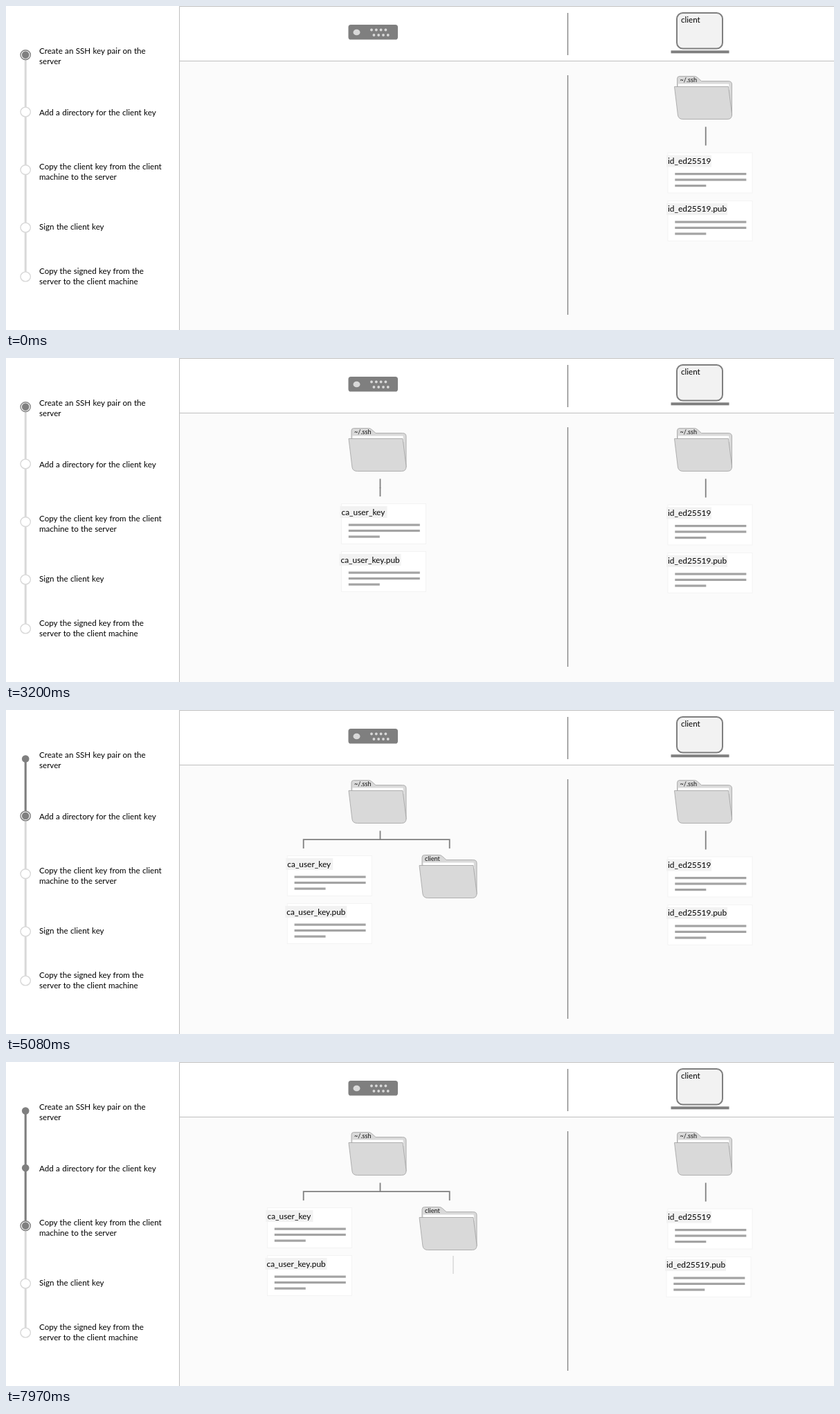
An HTML page for the animation above (8000 ms loop, 1196 by 468 pixels).

```html
<!DOCTYPE html>
<html lang="en">
<head>
<meta charset="utf-8">
<title>Signing a client key</title>
<style>
  html, body { margin: 0; width: 100%; height: 100%; overflow: hidden; background: #fff; }
  svg { display: block; width: 100%; height: 100%; }
  text { font-family: Lato, "Open Sans", sans-serif; font-size: 11.6px; word-spacing: .4px; fill: #000; }
  .name { font-size: 11.9px; }
  .tab { font-size: 9.1px; fill: #111; }
  .dark { stroke: #7f7f7f; fill: none; }
</style>
</head>
<body>
<svg id="stage" viewBox="0 0 1196 468"></svg>
<script>
const LOOP = 8000, STEP = 40, GREY = '#7f7f7f', AXIS = 28.2;
const stops = [70.6, 153, 236.6, 320, 391];

const text = (x, y, s, cls = '') => `<text x="${x}" y="${y}" class="${cls}">${s}</text>`;
const rect = (x, y, w, h, fill, more = '') =>
  `<rect x="${x}" y="${y}" width="${w}" height="${h}" fill="${fill}" ${more}/>`;
const path = (d, w = 1.8) => `<path class="dark" stroke-width="${w}" d="${d}"/>`;
const group = (id, body) => `<g id="${id}">${body}</g>`;

function folder(x, y, label) {
  return `<g transform="translate(${x} ${y})" stroke="#a0a0a0" stroke-width=".8">
    <path fill="#d9d9d9" d="M4.5 20V4Q4.5 .5 8 .5H29Q32 .5 34 2.5L39.5 7.5H78Q83.5 7.5 83.5 12V57H8Z"/>
    <path fill="#fff" stroke="none" d="M6 11.5H79L80 20H6Z"/>
    <path fill="#d9d9d9" d="M.5 15.5H78.5L83.5 55Q84 62.5 77 62.5H13Q6.500 62.5 5.5 57Z"/>
  </g>` + text(x + 8.5, y + 8.6, label, 'tab');
}

function card(x, y, label, w, shift = 0) {
  const bar = (dy, len) => rect(x + 10.3, y + dy, len, 3.2, '#a3a3a3');
  return rect(x, y, 122, 58, '#fff', 'stroke="#f3f3f3"') +
    rect(x - 2 + shift, y + 3.5, w, 17, '#f2f2f2') +
    text(x + shift, y + 16, label, 'name') +
    bar(29, 103) + bar(37.4, 103) + bar(46, 45);
}

function server() {
  let s = rect(494.5, 27, 71.5, 21.5, GREY, 'rx="3.6"') +
    '<ellipse cx="506.5" cy="38" rx="5" ry="4.3" fill="#d9d9d9"/>';
  for (let i = 0; i < 8; i++) {
    const low = i > 3;
    s += `<circle cx="${528 + (i % 4) * 6.8 + low * 3.4}" cy="${low ? 42 : 34.5}" r="1.9" fill="#d9d9d9"/>`;
  }
  return s;
}

const laptop = () => rect(969, 10, 66, 51.5, '#f2f2f2', `rx="8.6" stroke="${GREY}" stroke-width="2"`) +
  rect(960.5, 64.3, 84, 4, GREY) + text(975, 23.8, 'client');

const ring = (y, color) =>
  `<ellipse cx="${AXIS}" cy="${y}" rx="7.2" ry="6.9" fill="#fff" stroke="${color}" stroke-width="1.4"/>`;
const dot = y => `<circle cx="${AXIS}" cy="${y}" r="5.3" fill="${GREY}"/>`;
const track = (id, y, end, color) =>
  `<line id="${id}" x1="${AXIS}" x2="${AXIS}" y1="${y}" y2="${end}" stroke="${color}" stroke-width="3"/>`;

const captions = [
  [68.6, 'Create an SSH key pair on the'], [84.2, 'server'],
  [157.6, 'Add a directory for the client key'],
  [235.5, 'Copy the client key from the client'], [251.1, 'machine to the server'],
  [322.6, 'Sign the client key'],
  [386.5, 'Copy the signed key from the'], [402.1, 'server to the client machine']
];

const stage = document.getElementById('stage');
stage.innerHTML =
  rect(0, 0, 1196, 468, '#fff') + rect(250, 80, 946, 388, '#fbfbfb') +
  '<path d="M1196 .5H250.5V468M250 79.5H1196" fill="none" stroke="#bfbfbf"/>' +
  path('M811.5 10V71M811.5 100V446', 1.3) +
  server() + laptop() +
  track('base', stops[0], stops[4], '#d9d9d9') +
  track('run1', stops[0], stops[0], GREY) + track('run2', stops[1], stops[1], GREY) +
  stops.map((y, i) => i ? group('idle' + i, ring(y, '#d9d9d9')) : '').join('') +
  stops.slice(0, 3).map((y, i) => group('ring' + i, ring(y, GREY)) + group('dot' + i, dot(y))).join('') +
  captions.map(([y, s]) => text(48, y, s)).join('') +
  folder(965, 101, '~/.ssh') + path('M1010.7 174.5V201.5') +
  card(956, 212, 'id_ed25519', 65) +
  group('clientPub', card(956, 281.4, 'id_ed25519.pub', 88)) +
  group('home', folder(494.5, 101, '~/.ssh') + path('M540.5 174.5V188') +
    group('stem', path('M540.5 187V200')) +
    group('keys', card(484.5, 210.5, 'ca_user_key', 68) + card(484.5, 279.5, 'ca_user_key.pub', 89, -1))) +
  group('tree', path('M429.7 200V187.2H640.7V200') + folder(596.5, 209, 'client')) +
  group('branch', path('M646 280V306'));

const el = {};
stage.querySelectorAll('[id]').forEach(n => el[n.id] = n);
const fade = (id, v) => el[id].setAttribute('opacity', v);
const slide = (id, x) => el[id].setAttribute('transform', `translate(${x} 0)`);

// Cubic easing with zero slope at both ends
function ease(t, a = .41, b = .45) {
  let lo = 0, hi = 1;
  for (let i = 0; i < 24; i++) {
    const s = (lo + hi) / 2, r = 1 - s;
    if (3 * r * r * s * a + 3 * r * s * s * b + s * s * s < t) lo = s; else hi = s;
  }
  return hi * hi * (3 - 2 * hi);
}

function draw(now) {
  const t = now % LOOP;
  const part = (from, to) =>
    Math.min(1, Math.max(0, Math.floor((t - from) / STEP) * STEP / (to - from)));

  fade('home', part(1380, 1900));

  // Each step: the old ring fades, the line runs down, the next stop lights up
  fade('ring0', 1 - part(3160, 3680));
  fade('ring1', part(3840, 4360) * (1 - part(6650, 7170)));
  fade('ring2', part(7330, 7850));
  [3160, 6650].forEach((start, i) => {
    const next = i + 1, come = part(start + 680, start + 1200);
    el['run' + next].setAttribute('y2', stops[i] + (stops[next] - stops[i]) * part(start + 200, start + 840));
    fade('dot' + next, come);
    fade('idle' + next, 1 - come);
  });

  const grow = part(4360, 4880);
  fade('tree', grow);
  fade('stem', 1 - grow);
  slide('keys', -107 * ease(part(4360, 5600)));

  fade('branch', part(7850, 8370));
  slide('clientPub', -2 * part(7850, 7970) ** 2);
}

const begin = performance.now();
function tick() {
  draw(performance.now() - begin);
  requestAnimationFrame(tick);
}
draw(0);
requestAnimationFrame(tick);
</script>
</body>
</html>
```
